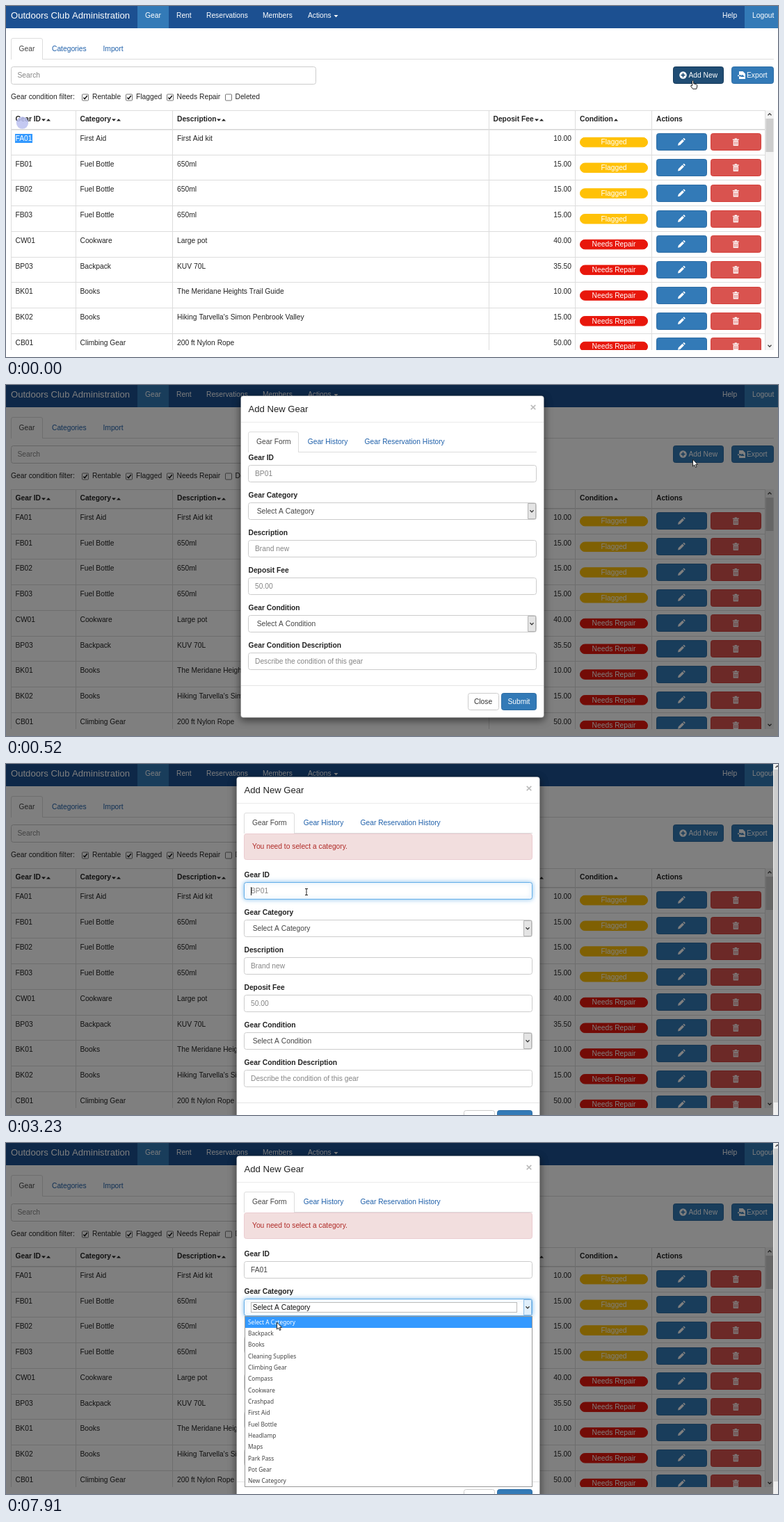
Write an HTML page with a canvas that moves like this. It is 1110 px wide and 505 px high and loops after 8000 ms.

```html
<!DOCTYPE html>
<html lang="en">
<head>
<meta charset="utf-8">
<title>Gear administration</title>
<style>
html, body { margin: 0; width: 100%; height: 100%; overflow: hidden; background: #fff; }
canvas { display: block; width: 1110px; height: 505px; }
</style>
</head>
<body>
<canvas id="stage" width="1110" height="505"></canvas>
<script>
const c = document.getElementById('stage').getContext('2d');
const LOOP = 8000, STEP = 120;
const SANS = '"Liberation Sans", Arial, sans-serif';
const BLUE = '#337ab7', EDGE = '#2e6da4', LINK = '#1f60aa', INK = '#222', GREY = '#858585';

// Bursts of redraws: start time and number of steps.
const bursts = [[0, 1], [120, 1], [260, 1], [400, 2], [700, 7], [1540, 6], [2390, 7],
  [3230, 1], [3730, 1], [4230, 1], [4730, 5], [5460, 2], [5830, 3], [6820, 5], [7550, 4]];
const ticks = bursts.flatMap(([t, n]) => Array.from({ length: n }, (_, i) => t + i * STEP));

const slide = [[260, -103], [400, -50], [520, -3], [700, 0]];
const fade = [[120, 0], [260, .12], [400, .78], [520, 1]];
const glowId = [[3110, 0], [3230, 1], [5710, 1], [6070, 0]];
const mouse = [[0, 987.5, 107], [520, 987.5, 107], [940, 640, 98], [1180, 431, 112], [1420, 540, 270],
  [1660, 735, 459], [2140, 735, 459], [2390, 700, 430], [3110, 432, 184], [4730, 432, 184],
  [5090, 691, 497], [5210, 715, 512], [5460, 731, 501], [6070, 731, 501], [6820, 690, 462],
  [7300, 395, 233], [7550, 395, 235], [7910, 389.5, 258]];

const rows = [
  ['FA01', 'First Aid', 'First Aid kit', '10.00'],
  ['FB01', 'Fuel Bottle', '650ml', '15.00'],
  ['FB02', 'Fuel Bottle', '650ml', '15.00'],
  ['FB03', 'Fuel Bottle', '650ml', '15.00'],
  ['CW01', 'Cookware', 'Large pot', '40.00'],
  ['BP03', 'Backpack', 'KUV 70L', '35.50'],
  ['BK01', 'Books', 'The Meridane Heights Trail Guide', '10.00'],
  ['BK02', 'Books', "Hiking Tarvella's Simon Penbrook Valley", '15.00'],
  ['CB01', 'Climbing Gear', '200 ft Nylon Rope', '50.00']
];
const fields = [['Gear ID', 'BP01'], ['Gear Category', 'Select A Category', true],
  ['Description', 'Brand new'], ['Deposit Fee', '50.00'],
  ['Gear Condition', 'Select A Condition', true],
  ['Gear Condition Description', 'Describe the condition of this gear']];
const options = ['Select A Category', 'Backpack', 'Books', 'Cleaning Supplies', 'Climbing Gear',
  'Compass', 'Cookware', 'Crashpad', 'First Aid', 'Fuel Bottle', 'Headlamp', 'Maps',
  'Park Pass', 'Pot Gear', 'New Category'];

const arrow = new Path2D('M0 0V10L2.3 7.9L4 11.5L5.6 10.8L4 7.3H7Z');
const hand = new Path2D('M2 1Q3 -.4 4 1V4.6L8 5.6Q9.6 6.2 9.2 9L8.2 12.3H3L0 8.3Q0 6.6 2 7.8Z');
const pencil = new Path2D('M-5 5L-4.2 1.8L1.6 -4L4 -1.6L-1.8 4.2ZM2.3 -4.7L3.2 -5.5Q3.8 -6 4.4 -5.4L5.4 -4.4Q6 -3.8 5.5 -3.2L4.7 -2.3Z');

// Values at time t between [time, ...values] points.
function at(points, t) {
  const i = points.findIndex(p => p[0] >= t);
  if (i < 0) return points[points.length - 1].slice(1);
  if (i === 0) return points[0].slice(1);
  const a = points[i - 1], b = points[i], k = (t - a[0]) / (b[0] - a[0]);
  return a.slice(1).map((v, j) => v + (b[j + 1] - v) * k);
}

function text(s, x, y, color = INK, { bold = false, size = 10.27, align = 'left', font = SANS } = {}) {
  c.font = `${bold ? 'bold ' : ''}${size}px ${font}`;
  c.textAlign = align;
  c.fillStyle = color;
  c.fillText(s, x, Math.round(y + size * .34));
}

function rect(x, y, w, h, color) {
  c.fillStyle = color;
  c.fillRect(x, y, w, h);
}

function box(x, y, w, h, r, fill, stroke) {
  c.beginPath();
  c.roundRect(x + .5, y + .5, w - 1, h - 1, r);
  c.fillStyle = fill;
  c.fill();
  c.lineWidth = 1;
  c.strokeStyle = stroke || fill;
  c.stroke();
}

function tri(x, y, dir, color = INK) {
  c.beginPath();
  c.moveTo(x - 3, y - 1.5 * dir);
  c.lineTo(x + 3, y - 1.5 * dir);
  c.lineTo(x, y + 1.7 * dir);
  c.fillStyle = color;
  c.fill();
}

function chevron(x, y, dir, color = '#444') {
  c.beginPath();
  c.moveTo(x - 2.5, y - 1.3 * dir);
  c.lineTo(x, y + 1.3 * dir);
  c.lineTo(x + 2.5, y - 1.3 * dir);
  c.lineWidth = 1.3;
  c.strokeStyle = color;
  c.stroke();
}

// Open-bottomed active tab.
function tab(x, y, w, h) {
  rect(x, y, w, h, '#fff');
  c.beginPath();
  c.moveTo(x + .5, y + h);
  c.lineTo(x + .5, y + 3);
  c.quadraticCurveTo(x + .5, y + .5, x + 3, y + .5);
  c.lineTo(x + w - 3, y + .5);
  c.quadraticCurveTo(x + w - .5, y + .5, x + w - .5, y + 3);
  c.lineTo(x + w - .5, y + h);
  c.lineWidth = 1;
  c.strokeStyle = '#ddd';
  c.stroke();
}

function navbar() {
  rect(0, 0, 1110, 32, '#1c5091');
  rect(189, 0, 45, 32, BLUE);
  rect(1062, 0, 48, 32, BLUE);
  text('Outdoors Club Administration', 7, 13.5, '#fff', { size: 13.1 });
  [['Gear', 200], ['Rent', 245], ['Reservations', 288], ['Members', 369], ['Actions', 434],
    ['Help', 1030], ['Logout', 1073]].forEach(([s, x]) => text(s, x, 13.5, '#fff'));
  tri(474.5, 14.5, 1, '#fff');
}

function toolbar(hover) {
  rect(7, 76, 1097, 1, '#ddd');
  tab(7, 46, 46, 31);
  text('Gear', 18.5, 62, '#444');
  text('Categories', 66, 62, LINK);
  text('Import', 139.5, 62, LINK);
  box(7, 87, 439, 26, 3, '#fff', '#ccc');
  text('Search', 16.5, 100, GREY);

  const add = hover ? '#204d74' : BLUE;
  box(959, 87, 73, 25, 3, add, hover ? '#163a5a' : EDGE);
  c.beginPath();
  c.arc(973.5, 99.5, 5.2, 0, 7);
  c.fillStyle = '#fff';
  c.fill();
  rect(970.5, 98.6, 6, 1.8, add);
  rect(972.6, 96.5, 1.8, 6, add);
  text('Add New', 981.5, 99.5, '#fff');

  box(1043, 87, 61, 25, 3, BLUE, EDGE);
  c.fillStyle = '#fff';
  c.fill(new Path2D('M1054 94H1059.5L1063 97.5V105H1054Z'));
  rect(1052, 99.5, 5, 1.6, '#fff');
  rect(1054, 99.3, 3.5, 2, BLUE);
  tri(1059, 100.5, -1, BLUE);
  text('Export', 1065, 99.5, '#fff');

  text('Gear condition filter:', 7, 131);
  [['Rentable', 109, 124], ['Flagged', 172, 187], ['Needs Repair', 231, 245.5], ['Deleted', 315, 329.5]]
    .forEach(([s, x, tx], i) => {
      box(x, 126.5, 10, 10, 1, '#fff', '#777');
      if (i < 3) {
        c.lineWidth = 1.5;
        c.strokeStyle = '#111';
        c.stroke(new Path2D(`M${x + 2.3} 131.7L${x + 4.2} 133.7L${x + 7.8} 129`));
      }
      text(s, tx, 131);
    });
}

function trash(x, y) {
  rect(x - 4.5, y - 4.2, 9, 1.3, '#fff');
  rect(x - 1.6, y - 5.4, 3.2, 1.3, '#fff');
  rect(x - 3.6, y - 2.3, 7.2, 7.6, '#fff');
  for (let i = -1; i < 2; i++) rect(x + i * 2 - .4, y - 1, .8, 5, '#d9534f');
}

function table(selected) {
  c.save();
  c.beginPath();
  c.rect(0, 150, 1110, 345);
  c.clip();
  rect(7, 150, 1085, 1, '#ddd');
  rect(7, 177, 1085, 1.5, '#d5d5d5');
  [7, 100, 239, 694, 818, 928, 1091].forEach(x => rect(x, 150, 1, 345, '#ddd'));
  [['Gear ID', 13.5, 54], ['Category', 106.5, 155], ['Description', 246, 306], ['Deposit Fee', 700.5, 763],
    ['Condition', 825, 870], ['Actions', 935]].forEach(([s, x, a], i) => {
    text(s, x, 163, INK, { bold: true });
    if (i < 4) tri(a, 164, 1);
    if (a) tri(a + 7, 164, -1);
  });
  rows.forEach(([id, cat, desc, fee], i) => {
    const y = 190.3 + i * 36.75, m = y + 5.5, top = Math.round(m - 12.5);
    rect(7, Math.round(y + 23.4), 1085, 1, '#ddd');
    const sel = selected && i === 0;
    if (sel) rect(13, 184, 25, 13, '#3399ff');
    text(id, 13.5, y, sel ? '#fff' : INK);
    text(cat, 106.5, y);
    text(desc, 246, y);
    text(fee, 813, y, INK, { align: 'right' });
    box(825, m - 7, 98, 14.5, 7, i < 4 ? '#ffc107' : '#e8170c');
    text(i < 4 ? 'Flagged' : 'Needs Repair', 874, m, '#fff', { align: 'center' });
    box(935, top, 73, 25, 3, BLUE, EDGE);
    box(1013, top, 73, 25, 3, '#d9534f', '#d43f3a');
    c.save();
    c.translate(971, m);
    c.fillStyle = '#fff';
    c.fill(pencil);
    c.restore();
    trash(1049.3, m);
  });
  rect(1092, 150, 12, 345, '#f3f3f3');
  rect(1092.5, 162, 11, 48, '#cdcdcd');
  chevron(1098, 156, -1);
  chevron(1098, 489, 1);
  c.restore();
}

function glow(x, y, w, h, k) {
  if (k <= 0) return;
  c.save();
  c.globalAlpha *= k;
  c.shadowColor = 'rgba(102,175,233,.8)';
  c.shadowBlur = 6;
  box(x, y, w, h, 3, '#fff', '#66afe9');
  c.restore();
}

function field(i, s) {
  const [label, hint, select] = fields[i];
  const y = Math.round(118.4 + 53.9 * i), m = y + 12.6;
  const open = i === 1 && s.open;
  text(label, 348.5, 107.4 + 53.95 * i, INK, { bold: true });
  box(348, y, 415, 25, 3, '#fff', '#ccc');
  glow(348, y, 415, 25, i === 0 ? s.focus : open ? 1 : 0);
  if (select) {
    if (open) {
      c.setLineDash([1, 1]);
      box(358, y + 5, 383, 15, 0, '#fff', '#777');
      c.setLineDash([]);
    }
    text(hint, 360.7, m, open ? '#111' : '#444');
    box(750, y + 1, 12, 23, 0, open ? '#e0effb' : '#e4e4e4', open ? '#8dbde6' : '#b5b5b5');
    chevron(756, m, 1, '#333');
    return;
  }
  const value = i === 0 && s.typed ? 'FA01' : '';
  text(value || hint, 358, m, value ? '#444' : GREY);
  if (i === 0 && s.caret) rect(358 + (value ? c.measureText(value).width + .5 : 0), y + 7, 1, 12, '#222');
}

function dropdown() {
  rect(349, 249, 414, 246, '#fff');
  options.forEach((s, i) => {
    const y = 258 + i * 16.32;
    if (!i) rect(349, 249, 414, 17, '#3399ff');
    text(s, 354, y, i ? '#444' : '#fff', { size: 8.3, font: '"Noto Sans", "Open Sans", sans-serif' });
  });
  c.lineWidth = 1;
  c.strokeStyle = '#999';
  c.strokeRect(349.5, 249.5, 413, 245);
}

function modal(s) {
  const extra = s.alert ? 52 : 0, h = 464 + extra;
  c.save();
  c.globalAlpha = s.alpha;
  c.translate(s.alert ? -6 : 0, s.dy);

  // Shadow only outside the dialog.
  c.save();
  c.beginPath();
  c.rect(0, -200, 1200, 900);
  c.roundRect(337, 18, 437, h, 4);
  c.clip('evenodd');
  c.shadowColor = 'rgba(0,0,0,.5)';
  c.shadowBlur = 11;
  c.shadowOffsetY = 3.7;
  box(337, 18, 437, h, 4, '#000');
  c.restore();
  box(337, 18, 437, h, 4, '#fff', 'rgba(0,0,0,.2)');

  text('Add New Gear', 348.5, 37.7, '#222', { size: 13.1 });
  text('×', 758, 34.5, '#bbb', { size: 15.4, bold: true, align: 'center' });
  rect(338, 56, 435, 1, '#ebebeb');
  rect(348, 99, 415, 1, '#ddd');
  if (s.tabHover) box(422, 70, 81, 29, 3, '#eee');
  tab(348, 70, 73, 30);
  text('Gear Form', 360, 85, '#444');
  text('Gear History', 433.7, 85, s.tabHover ? '#173f73' : LINK);
  text('Gear Reservation History', 515.5, 85, LINK);
  if (s.alert) {
    box(348, 100, 415, 38, 3, '#f2dede', '#ebccd1');
    text('You need to select a category.', 360, 119, '#b02c28');
  }

  c.save();
  c.translate(0, extra);
  fields.forEach((_, i) => field(i, s));
  rect(338, 435, 435, 1, '#e5e5e5');
  box(664, 446, 45, 25, 3, '#fff', '#ccc');
  text('Close', 686, 458.7, '#333', { align: 'center' });
  box(712, 446, 51, 25, 3, s.press ? '#204d74' : s.hover ? '#286090' : BLUE, s.hover ? '#204d74' : EDGE);
  text('Submit', 737.5, 458.7, '#fff', { align: 'center' });
  c.restore();
  if (s.open) dropdown();
  c.restore();
}

function pageScroll() {
  rect(1103, 0, 7, 505, '#f0f0f0');
  rect(1104, 8, 6, 479, '#cdcdcd');
  chevron(1109, 4, -1);
}

function pointer(t) {
  const [x, y] = at(mouse, t);
  c.save();
  c.translate(x, y);
  c.lineJoin = 'round';
  c.lineWidth = 1;
  c.strokeStyle = '#222';
  c.fillStyle = '#fff';
  if (t >= 3110 && t < 4730) {
    c.stroke(new Path2D('M-2 -4.5H2M0 -4.5V4.5M-2 4.5H2'));
  } else {
    const onButton = t < 260 || within(t, 1660, 2140) || within(t, 5460, 6070);
    if (onButton) c.translate(-3, 0);
    c.fill(onButton ? hand : arrow);
    c.stroke(onButton ? hand : arrow);
  }
  c.restore();
}

const within = (t, a, b) => t >= a && t <= b;

function draw(t) {
  rect(0, 0, 1110, 505, '#fff');
  navbar();
  toolbar(t < 260);
  table(t < 260);
  if (t < 260) {
    c.beginPath();
    c.arc(23.5, 168, 8.7, 0, 7);
    c.fillStyle = t < 120 ? 'rgba(186,192,240,.85)' : 'rgba(186,192,240,.5)';
    c.fill();
  }
  const [alpha] = at(fade, t);
  if (alpha > 0) {
    rect(0, 0, 1110, 505, `rgba(0,0,0,${alpha / 2})`);
    modal({
      alpha,
      dy: at(slide, t)[0],
      alert: t >= 1900,
      tabHover: t === 1180,
      focus: at(glowId, t)[0],
      caret: within(t, 3110, 3729) || within(t, 4230, 5209),
      typed: t >= 4730,
      hover: within(t, 1660, 2140) || within(t, 5460, 6070),
      press: t === 1780 || t === 5580,
      open: t >= 7550
    });
  }
  if (t >= 1900) pageScroll();
  pointer(t);
}

const start = performance.now();
function loop() {
  const t = (performance.now() - start) % LOOP;
  draw(ticks.findLast(k => k <= t));
  requestAnimationFrame(loop);
}
loop();
</script>
</body>
</html>
```
